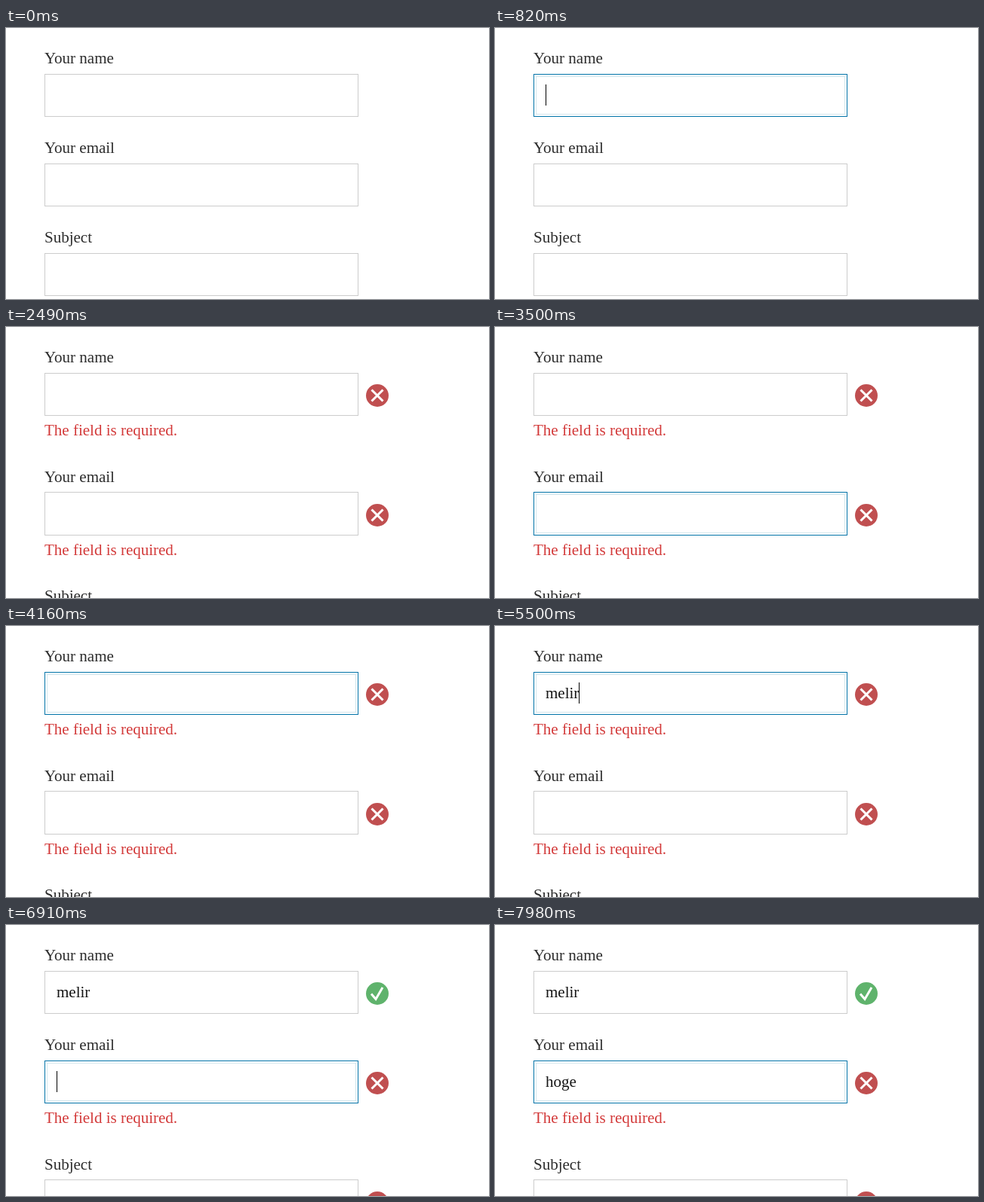
An HTML page for the animation above (8 s loop, 640 by 360 pixels).

```html
<!DOCTYPE html>
<html lang="en">
<head>
<meta charset="utf-8">
<title>Form validation</title>
<style>
  html, body { margin: 0; height: 100%; overflow: hidden; background: #fff; }
  svg { display: block; width: 640px; height: 360px; }
  text { font: 21px "Liberation Serif", "Times New Roman", serif; fill: #2c2c2c; }
  rect { fill: none; stroke: #ccc; }
  .focus .box { stroke: #0073a8; }
  .ring { stroke: #d2e6ec; }
  .value { fill: #151515; }
  .error { fill: #d33a3a; }
  .caret { fill: #000; stroke: none; }
  .mark { fill: none; stroke: #fff; stroke-width: 3; }
  .ring, .bad, .ok { visibility: hidden; }
  .focus .ring, .is-bad .bad, .is-ok .ok { visibility: visible; }
</style>
</head>
<body>
<svg viewBox="0 0 640 360"></svg>
<script>
const LOOP = 8000, PITCH = 119, ERROR_HEIGHT = 39.5;
const svg = document.querySelector('svg');

svg.innerHTML = ['Your name', 'Your email', 'Subject'].map(label => `
  <g>
    <text x="51" y="47">${label}</text>
    <rect class="box" x="51.5" width="415"/>
    <rect class="ring" x="54.5" width="409"/>
    <text class="value" x="67" y="96"></text>
    <rect class="caret" y="75" width="1" height="28"/>
    <text class="error bad" x="51" y="144">The field is required.</text>
    <g class="bad">
      <circle cx="492" cy="91" r="15" fill="#c04f50"/>
      <path class="mark" d="M484.5 83.5l15 15m0-15l-15 15"/>
    </g>
    <g class="ok">
      <circle cx="492" cy="91" r="15" fill="#5fb36c"/>
      <path class="mark" d="M484 91.5l6 7L499 83"/>
    </g>
  </g>`).join('');

const rows = [...svg.children].map(group => ({
  group,
  box: group.querySelector('.box'),
  ring: group.querySelector('.ring'),
  value: group.querySelector('.value'),
  caret: group.querySelector('.caret')
}));

// Each step changes only the listed parts of the state.
const steps = [
  [0, { focus: -1, caret: false, values: ['', '', ''], marks: ['', '', ''] }],
  [820, { focus: 0, caret: true }],
  [1090, { caret: false }],
  [1480, { focus: 1, caret: true }],
  [1550, { marks: ['bad', '', ''] }],
  [2020, { caret: false }],
  [2370, { focus: 2, caret: true }],
  [2490, { marks: ['bad', 'bad', ''] }],
  [2960, { focus: 1, marks: ['bad', 'bad', 'bad'] }],
  [3500, { caret: false }],
  [3630, { focus: 0, caret: true }],
  [4160, { caret: false }],
  [4690, { caret: true }],
  ...typing(0, 'melir', [4760, 4830, 5030, 5230, 5500]),
  [5890, { focus: 1, marks: ['', 'bad', 'bad'] }],
  [5960, { marks: ['ok', 'bad', 'bad'] }],
  [6440, { caret: false }],
  [6910, { caret: true }],
  ...typing(1, 'hoge', [6980, 7180, 7380, 7450], 'melir'),
  [7980, { caret: false }]
];

function typing(row, word, times, before = '') {
  return times.map((time, i) => {
    const typed = word.slice(0, i + 1);
    return [time, { values: row ? [before, typed, ''] : [typed, '', ''] }];
  });
}

function setSpan(rect, top, bottom) {
  rect.setAttribute('y', top + 0.5);
  rect.setAttribute('height', bottom - top - 1);
}

function render(time) {
  const state = Object.assign({}, ...steps.filter(s => s[0] <= time).map(s => s[1]));
  let shift = 0;
  rows.forEach(({ group, box, ring, value, caret }, i) => {
    const focused = state.focus === i, mark = state.marks[i];
    const offset = Math.ceil(shift);
    const top = 61 + Math.floor(shift) - offset;
    group.setAttribute('transform', `translate(0 ${PITCH * i + offset})`);
    group.setAttribute('class', (focused ? 'focus ' : '') + (mark && 'is-' + mark));
    setSpan(box, top, 118);
    setSpan(ring, top + 3, 115);
    value.textContent = state.values[i];
    caret.setAttribute('x', Math.round(67 + value.getComputedTextLength()));
    caret.style.visibility = focused && state.caret ? 'visible' : 'hidden';
    if (mark === 'bad') shift += ERROR_HEIGHT;
  });
}

const start = performance.now();
function tick() {
  render((performance.now() - start) % LOOP);
  requestAnimationFrame(tick);
}
tick();
</script>
</body>
</html>
```
